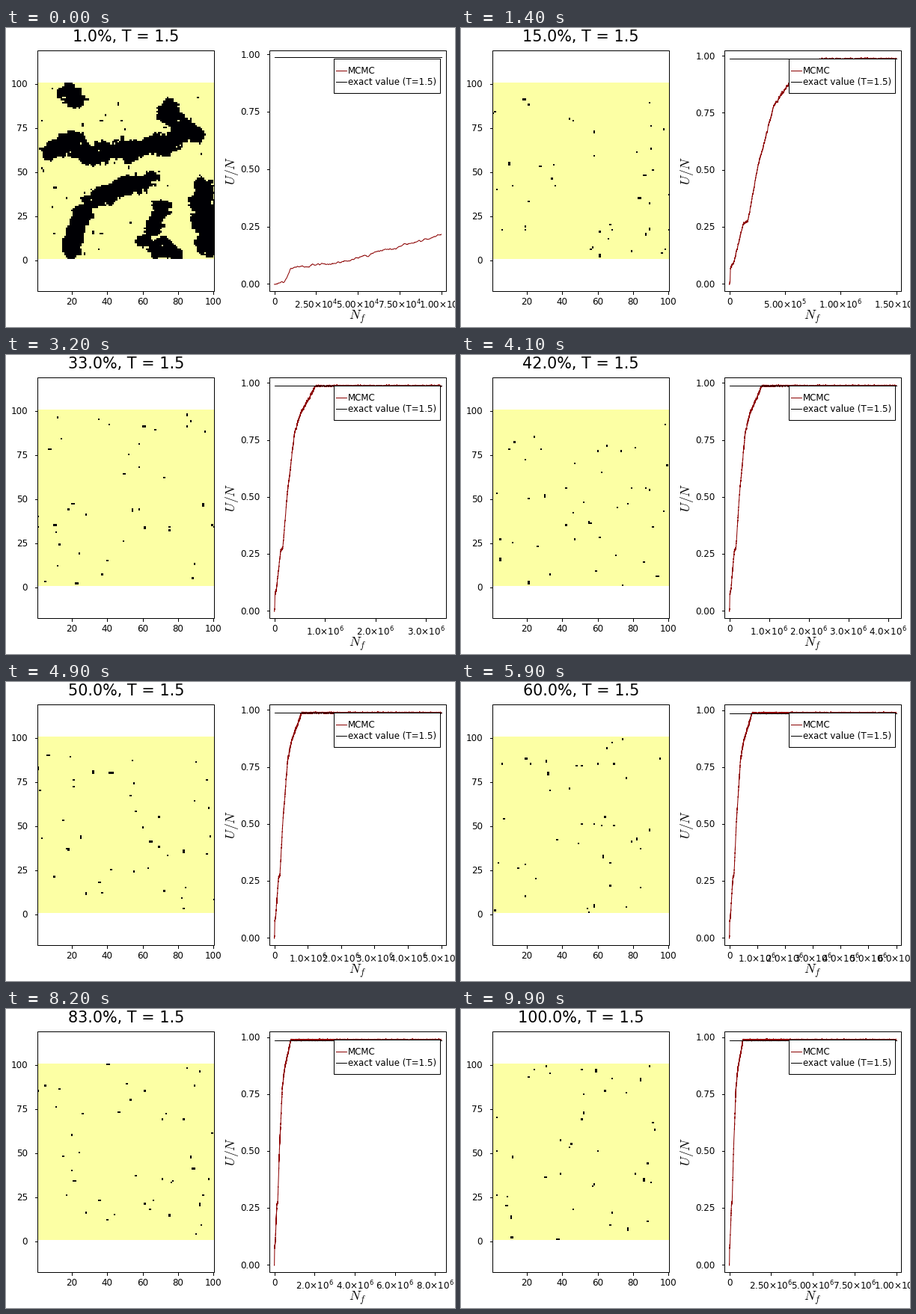
Write a matplotlib script that moves like this. It is 600x400 px and loops after 10000 ms.

```python
import numpy as np
import matplotlib.pyplot as plt
from matplotlib.animation import FuncAnimation
from matplotlib.patches import Rectangle

W, H, DPI = 600, 400, 100
FRAMES, CHUNK, STEP = 100, 100_000, 250
SIZE = 100
EXACT = (1 - np.sinh(2 / 1.5) ** -4) ** 0.125
PX = 72 / DPI
SMALL, LARGE, LABEL = 11.86 * PX, 20.75 * PX, 17.7 * PX
YELLOW, BLACK, RED = (252, 255, 164), (0, 0, 4), "#8b0000"

# Lattice edges on the stage
LEFT, RIGHT, TOP, BOTTOM = 42, 278.5, 73.8, 309.5

plt.rcParams["font.family"] = "DejaVu Sans"
plt.rcParams["mathtext.fontset"] = "dejavusans"


def growth(flips):
    """Mean magnetisation: fast start, one stall, then saturation."""
    n = (0, .6, 1, 3.4, 13, 16.5, 25, 40, 52, 82)
    m = (0, .005, .07, .084, .27, .27, .5, .78, .868, .987)
    return np.interp(np.asarray(flips) / 1e4, n, m)


def make_series():
    rng = np.random.default_rng(15)
    n = np.arange(0, FRAMES * CHUNK + 1, STEP)
    memory = .93 ** np.arange(80)
    wobble = np.convolve(rng.normal(size=n.size), memory)[:n.size]
    wobble /= np.sqrt((memory ** 2).sum())
    return n, growth(n) + wobble * np.where(n < 8e5, .0035, .0016)


def make_field():
    """Rough signed distance to a few snaking domains, one value per spin."""
    chains = (
        (14, (60, 165), (88, 152), (112, 172), (195, 160), (248, 142), (215, 114)),
        (12, (188, 204), (145, 216), (95, 250), (89, 298)),
        (14, (266, 215), (264, 255), (270, 292)),
        (11, (206, 245), (186, 285), (225, 303)),
        (13, (84, 84), (94, 96)),
    )
    c = (np.arange(SIZE) + .5) / SIZE
    x, y = np.meshgrid(LEFT + (RIGHT - LEFT) * c, TOP + (BOTTOM - TOP) * c)
    spot = x + 1j * y
    field = np.full(spot.shape, np.inf)
    for radius, *points in chains:
        path = [complex(*p) for p in points]
        for a, b in zip(path, path[1:]):
            t = ((spot - a) / (b - a)).real.clip(0, 1)
            field = np.minimum(field, abs(spot - a - t * (b - a)) - radius)

    rng = np.random.default_rng(4)
    for reach, gain in ((1, 4), (4, 26)):
        noise = rng.normal(size=spot.shape)
        for axis in (0, 1):
            noise = np.mean([np.roll(noise, s, axis)
                             for s in range(-reach, reach + 1)], axis=0)
        field += gain * noise
    return field


FLIPS, MAG = make_series()
FIELD = make_field()
SHARE = (FIELD < 0).mean()


def spins(k):
    """Lattice image: shrinking domains at first, then thermal flips only."""
    rng = np.random.default_rng(700 + k)
    down = np.zeros((SIZE, SIZE), bool)
    if k < 7:
        m0, m = growth([CHUNK, CHUNK * (k + 1)])
        down = FIELD < np.quantile(FIELD, SHARE * (1 - m) / (1 - m0))
    for r, c in rng.integers(0, SIZE, (42, 2)):
        down[r, c] ^= True
        if rng.random() < .2:
            side = rng.integers(2)
            down[(r + side) % SIZE, (c + 1 - side) % SIZE] ^= True
    return np.where(down[..., None], BLACK, YELLOW).astype(np.uint8)


def nice_ticks(top):
    """Evenly spaced ticks from zero, chosen by count, coverage and niceness."""
    best = None
    z0 = int(np.floor(np.log10(top) + 1e-9))
    for z in (z0 - 1, z0):
        for q, nice in ((1, 1), (5, .9), (2, .7), (2.5, .5), (3, .2)):
            step = q * 10.0 ** z
            n = int(1.03 * top / step + 1e-9) + 1
            if not 4 <= n <= 8:
                continue
            score = ((1 - abs(n - 5) / 5) / 4 + nice / 4
                     + .53 * top / ((n - 1) * step))
            key = (round(score, 6), -n)
            if best is None or key > best[0]:
                best = key, step, n
    return best[1] * np.arange(best[2])


def sci_labels(ticks):
    exps = [int(np.floor(np.log10(v) + 1e-9)) for v in ticks[1:]]
    mants = [v / 10.0 ** e for v, e in zip(ticks[1:], exps)]
    places = 1 + any(abs(m - round(m)) > 1e-6 for m in mants)
    return ["0"] + [rf"$\mathrm{{{m:.{places}f}{{\times}}10^{{{e}}}}}$"
                    for m, e in zip(mants, exps)]


fig = plt.figure(figsize=(W / DPI, H / DPI), dpi=DPI, facecolor="white")
ax = fig.add_axes([0, 0, 1, 1])
ax.axis("off")


def line(x=(), y=(), color="black", z=3):
    return ax.plot(x, y, color=color, lw=PX, zorder=z)[0]


def text(x, y, s, size=SMALL, ha="center", va="baseline", **kw):
    return ax.text(x, y, s, fontsize=size, ha=ha, va=va, zorder=7, **kw)


def box(x0, y0, x1, y1, fill="none", z=4):
    ax.add_patch(Rectangle((x0, y0), x1 - x0, y1 - y0, fc=fill, ec="black",
                           lw=PX, zorder=z))


# Lattice panel
lattice = ax.imshow(spins(0), extent=(LEFT, RIGHT, BOTTOM, TOP), aspect="auto",
                    interpolation="nearest", zorder=1)
box(42, 30, 278, 352)
for v in range(20, SIZE + 1, 20):
    x = LEFT + (RIGHT - LEFT) * (v - .5) / SIZE
    line((x, x), (352, 355.5))
    text(x, 370.3, str(v))
for v in range(0, SIZE + 1, 25):
    y = BOTTOM - (BOTTOM - TOP) * (v - .5) / SIZE
    line((38.5, 42), (y, y))
    text(29, y + 4.4, str(v), ha="right")
title = text(160.3, 18.4, "", LARGE)

# Curve panel
X0, X1, Y0, Y1 = 358.6, 581.5, 343.1, 39.4
box(352, 30, 588, 352)
curve = line(color=RED, z=2)
exact = line()
Y_TICKS = np.linspace(0, 1, 5)
y_marks = [line() for _ in Y_TICKS]
y_texts = [text(339.6, 0, f"{v:.2f}", ha="right") for v in Y_TICKS]
x_marks = [line() for _ in range(8)]
x_texts = [text(0, 0, "") for _ in range(8)]
text(470, 390.4, "$N_f$", LABEL, math_fontfamily="cm")
text(302, 190.5, "$U/N$", LABEL, va="center", rotation=90,
     math_fontfamily="cm")

# Legend
box(438, 41, 580, 87, "white", 5)
for y, color, name in ((57, RED, "MCMC"), (72, "black", "exact value (T=1.5)")):
    line((441, 455), (y, y), color, 6)
    text(457.3, y + 4.4, name, ha="left")

ax.set_xlim(0, W)
ax.set_ylim(H, 0)


def draw(k):
    total = (k + 1) * CHUNK
    end = total // STEP + 1
    n, m = FLIPS[:end], MAG[:end]
    low, high = min(0, m.min()), max(EXACT, m.max())

    def to_x(v):
        return X0 + (X1 - X0) * v / total

    def to_y(v):
        return Y0 + (Y1 - Y0) * (v - low) / (high - low)

    title.set_text(f"{k + 1:.1f}%, T = 1.5")
    lattice.set_data(spins(k))
    curve.set_data(to_x(n), to_y(m))
    exact.set_data((X0, X1), (to_y(EXACT),) * 2)

    for v, mark, label in zip(Y_TICKS, y_marks, y_texts):
        y = to_y(v)
        mark.set_data((348.5, 352), (y, y))
        label.set_y(y + 4.4)

    ticks = nice_ticks(total)
    labels = sci_labels(ticks)
    for i, (mark, label) in enumerate(zip(x_marks, x_texts)):
        shown = i < len(ticks)
        mark.set_visible(shown)
        label.set_visible(shown)
        if shown:
            x = to_x(ticks[i])
            mark.set_data((x, x), (352, 355.5))
            label.set_text(labels[i])
            label.set_position((x, 375.8 if i else 370.3))
    return []


anim = FuncAnimation(fig, draw, frames=FRAMES, interval=100,
                     init_func=lambda: [], repeat=True)
plt.show()
```
